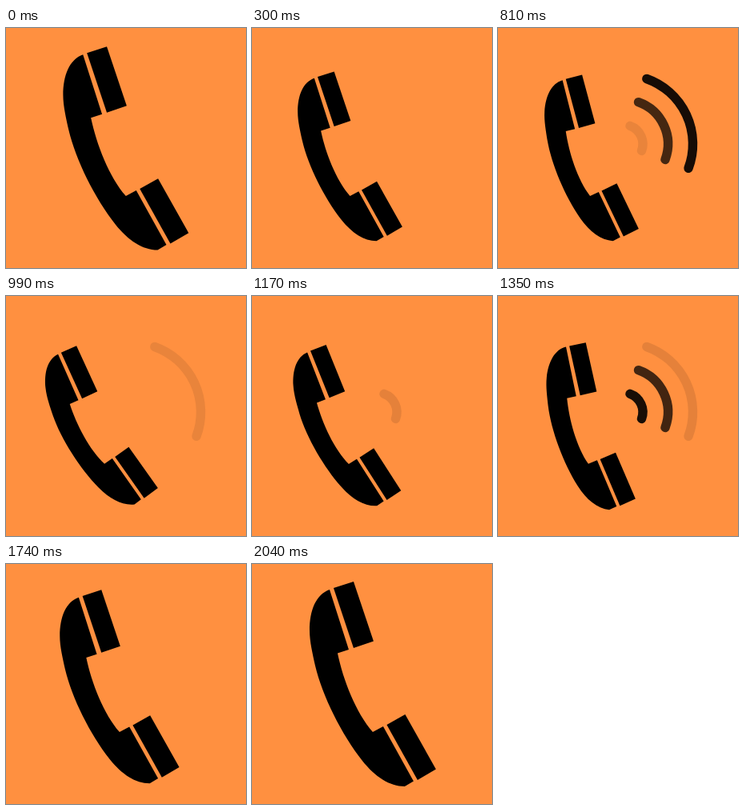
An HTML page for the animation above (2.1 s loop, 300 by 300 pixels).

```html
<!DOCTYPE html>
<html lang="en">
<head>
<meta charset="utf-8">
<title>Ringing phone</title>
<style>
  html, body { margin: 0; height: 100%; overflow: hidden; background: #ff9040; }
  svg { display: block; width: 100vw; height: 100vh; }
  .wave { fill: none; stroke: #000; stroke-width: 11.5; stroke-linecap: round; }
</style>
</head>
<body>
<svg viewBox="0 0 300 300">
  <g id="phone">
    <path d="M97 32 121 107 107 111.5C114 145 130 186 151 210L164 203 202 271.5 191 278
      C172 278 154 266 138 246C112 213 88 165 79 127C76 113 72 97 72 83C72 58 80 38 97 32Z"/>
    <path d="M102 30 127 22 152 96.5 127 105Z"/>
    <path d="M168.5 201 191.5 188 230 256.5 207 270Z"/>
  </g>
</svg>
<script>
const LOOP = 2100, STEP = 30;
const SHRINK = { start: -30, length: 580 };
const GROW = { start: 1490, length: 580 };
const SHAKE = { start: 550, period: 240, turns: 4, angle: 7 };
const WAVE_STARTS = [502, 1156];
const FADE = 140, HOLD = 40, WAVE_DELAY = 90;

const svg = document.querySelector('svg');
const phone = document.getElementById('phone');
const clamp = v => Math.min(1, Math.max(0, v));
const progress = (t, { start, length }) => ease(clamp((t - start) / length));

// Bezier easing with control points (.25, .1) and (.25, 1)
function ease(x) {
  let lo = 0, hi = 1;
  for (let i = 0; i < 24; i++) {
    const s = (lo + hi) / 2;
    if (0.75 * s * (1 - s) + s ** 3 < x) lo = s; else hi = s;
  }
  const s = lo, r = 1 - s;
  return 0.3 * s * r * r + 3 * s * s * r + s ** 3;
}

// Quarter circles around one centre
const waves = [24, 55.5, 86.5].map(radius => {
  const at = deg => {
    const a = deg * Math.PI / 180;
    return `${157 + radius * Math.cos(a)} ${145 + radius * Math.sin(a)}`;
  };
  const path = document.createElementNS(svg.namespaceURI, 'path');
  path.setAttribute('class', 'wave');
  path.setAttribute('d', `M${at(-70.5)}A${radius} ${radius} 0 0 1 ${at(20.5)}`);
  return svg.appendChild(path);
});

function waveOpacity(age) {
  return clamp(Math.min(age / FADE, (2 * FADE + HOLD - age) / FADE));
}

function draw(t) {
  const small = progress(t, SHRINK) - progress(t, GROW);
  const turn = (t - SHAKE.start) / SHAKE.period;
  const shaking = turn > 0 && turn < SHAKE.turns;
  const angle = shaking ? SHAKE.angle * Math.sin(turn * 2 * Math.PI) : 0;
  phone.setAttribute('transform',
    `translate(${151 - 33 * small} ${150 + 12 * small}) rotate(${angle}) ` +
    `scale(${1 - 0.2 * small}) translate(-151 -150)`);
  waves.forEach((wave, i) => {
    const levels = WAVE_STARTS.map(start => waveOpacity(t - start - i * WAVE_DELAY));
    wave.setAttribute('opacity', Math.max(...levels));
  });
}

const begin = performance.now();
function tick() {
  const t = (performance.now() - begin) % LOOP;
  draw(Math.min(Math.floor(t / STEP) * STEP, LOOP - 2 * STEP));
  requestAnimationFrame(tick);
}
tick();
</script>
</body>
</html>
```
